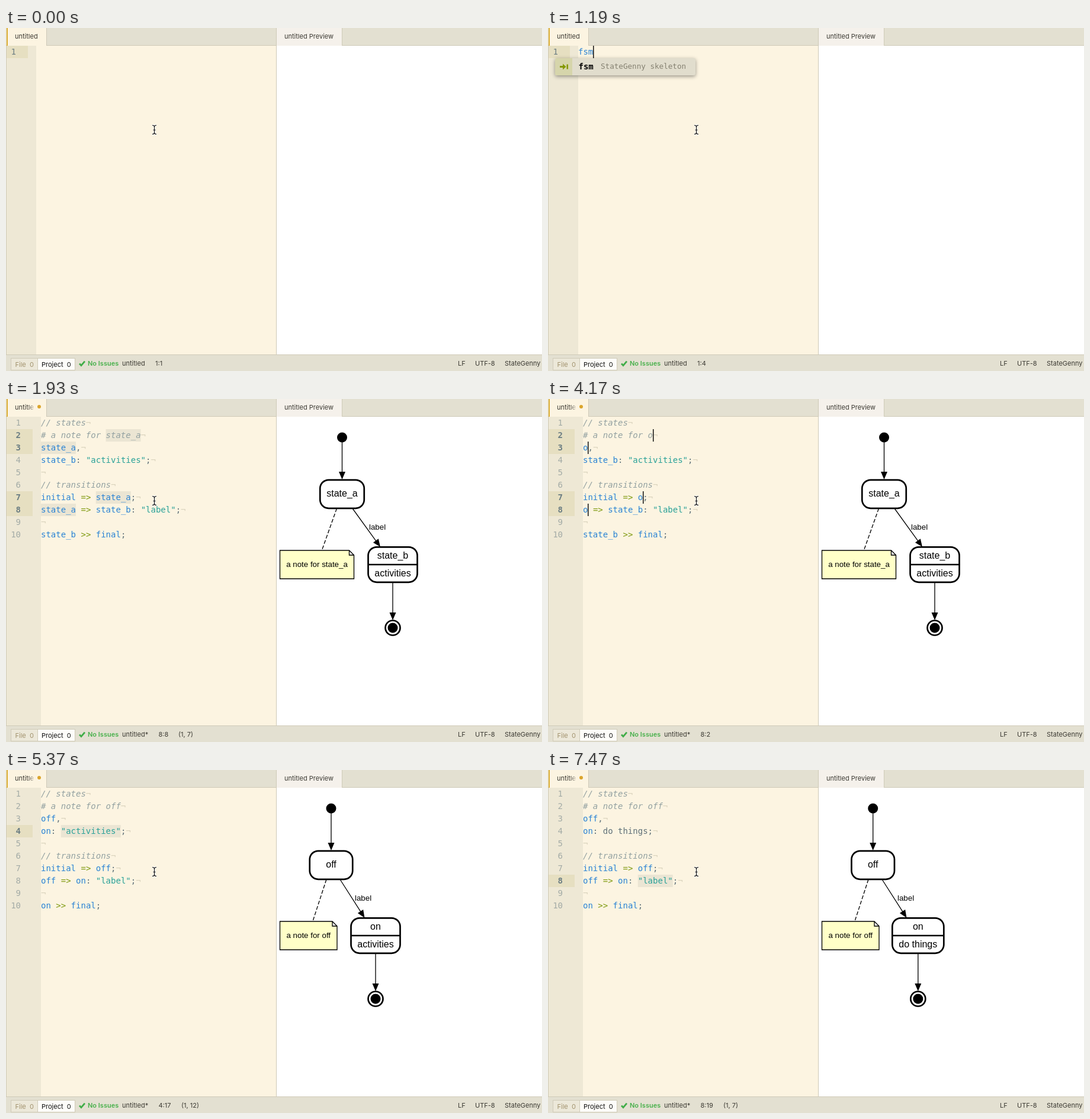
Animation, 905 px wide and 580 px high, one loop 8000 ms. Source, as an HTML page:

```html
<!DOCTYPE html>
<html lang="en">
<head>
<meta charset="utf-8">
<title>State machine editor</title>
<style>
html, body { margin: 0; width: 100%; height: 100%; overflow: hidden; background: #fff; }
svg { display: block; width: 100%; height: 100%; }
text { white-space: pre; }
.ui { font: 11px Inter, sans-serif; fill: #3c3a33; }
.code, .num { font: 14px "DejaVu Sans Mono", monospace; }
.num { fill: #a3aba6; text-anchor: end; }
.num.on { fill: #6b7d82; }
.num.bold { font-weight: bold; }
.comment { fill: #93a1a1; font-style: italic; }
.string { fill: #2aa198; }
.op { fill: #7f9a10; }
.name { fill: #2a83d4; }
.plain { fill: #5f7078; }
.eol { fill: #dad3bd; }
.sel { fill: #ebe5d3; }
.popup { filter: drop-shadow(0 2px 3px rgba(0, 0, 0, .4)); }
.msg { font: 13px Inter, sans-serif; fill: #45433b; }
.big { font: 16px "Liberation Sans", Helvetica, sans-serif; text-anchor: middle; }
.small { font: 13.33px "Liberation Sans", Helvetica, sans-serif; }
.edge { stroke: #000; stroke-width: 1.33; fill: none; }
.box { stroke: #000; stroke-width: 2.7; fill: none; }
</style>
</head>
<body>
<svg viewBox="0 0 905 580">
  <defs>
    <linearGradient id="fade" gradientUnits="userSpaceOnUse" x1="38" x2="48" y1="0" y2="0">
      <stop stop-color="#3c3a33"/>
      <stop offset="1" stop-color="#3c3a33" stop-opacity="0.1"/>
    </linearGradient>
  </defs>

  <rect width="905" height="580" fill="#e3e0d1"/>
  <rect y="29" width="905" height="524" fill="#cfcab8"/>
  <rect x="1" y="30" width="455" height="522" fill="#fcf4e1"/>
  <rect x="457" y="30" width="448" height="522" fill="#fff"/>
  <rect x="456" width="1" height="552" fill="#cfcab8"/>
  <rect x="1" width="67" height="30" fill="#fcf4e1"/>
  <rect x="1" width="2" height="30" fill="#dcae35"/>
  <rect x="68" width="1" height="30" fill="#cfcab8"/>
  <rect x="457" width="110" height="30" fill="#f5f1eb"/>
  <rect x="567" width="1" height="30" fill="#cfcab8"/>
  <text class="ui" x="470" y="18">untitled Preview</text>

  <rect x="8.5" y="558.5" width="45" height="20" fill="#ece8d9" stroke="#d0cbb8"/>
  <rect x="53.5" y="558.5" width="63" height="20" fill="#fdfcf9" stroke="#d0cbb8"/>
  <text class="ui" x="15.500" y="573" style="fill:#a1916c">File  0</text>
  <text class="ui" x="60" y="573" style="fill:#111">Project  0</text>
  <path d="M124 567.500l3 3.200 6-7" fill="none" stroke="#40ad48" stroke-width="2.800"/>
  <text class="ui" x="138" y="571" style="fill:#47b04b;font-weight:600">No Issues</text>
  <text class="ui" x="763" y="571">LF</text>
  <text class="ui" x="792" y="571">UTF-8</text>
  <text class="ui" x="842" y="571">StateGenny</text>

  <g id="scene"></g>

  <g id="pointer" fill="none">
    <path id="beam" d="M247 164.500q3 0 3.500 2q.5-2 3.500-2M250.500 166.500v11M247 179.500q3 0 3.500-2q.5 2 3.500 2M248.500 172.500h4" stroke="#fff" stroke-opacity=".7" stroke-width="3"/>
    <use href="#beam"/>
    <path d="M247 164.500q3 0 3.500 2q.5-2 3.500-2M250.500 166.500v11M247 179.500q3 0 3.500-2q.5 2 3.500 2M248.500 172.500h4" stroke="#111" stroke-width="1.200"/>
  </g>
</svg>
<script>
const LOOP = 8000, CHAR = 8.43, ROW = 21, TOP = 30;
const scene = document.getElementById('scene');

const rect = (x, y, w, h, attrs) => `<rect x="${x}" y="${y}" width="${w}" height="${h}" ${attrs}/>`;
const text = (cls, x, y, s, attrs = '') => `<text class="${cls}" x="${x}" y="${y}" ${attrs}>${s}</text>`;

// In code lines, [..] marks a selection and | a caret.
const snippet = (a, b, activity, label = '"label"') => [
  '// states', `# a note for ${a}`, `${a},`, `${b}: ${activity};`, '',
  '// transitions', `initial => ${a};`, `${a} => ${b}: ${label};`, '', `${b} >> final;`
];

const TOKENS = /^(?:\/\/|#).*|"[^"]*"|[=>]>|: [a-z ]*|\w+|[^\w"]/g;
function tokenClass(t) {
  if (/^(\/\/|#)/.test(t)) return 'comment';
  if (t[0] === '"') return 'string';
  if (/^[=>]>/.test(t)) return 'op';
  return /^\w/.test(t) ? 'name' : 'plain';
}
const span = (cls, s) => `<tspan class="${cls}">${s}</tspan>`;

function editor(lines) {
  const wide = lines.length > 9 ? 8 : 0, left = 51 + wide;
  let out = rect(1, TOP, left - 1, 522, 'fill="#eee8d5"');
  lines.forEach((line, i) => {
    const y = TOP + i * ROW, open = line.indexOf('['), caret = line.indexOf('|');
    const active = lines.length === 1 || open >= 0 || caret >= 0;
    if (active) out += rect(1, y, 36 + wide, ROW, 'fill="#e6dfc1"');
    out += text(`num${active ? ' on' : ''}${active && wide ? ' bold' : ''}`, 17 + wide, y + 15, i + 1);
    if (open >= 0) {
      const length = line.indexOf(']') - open - 1;
      out += rect(left + open * CHAR, y, length * CHAR, ROW, 'class="sel"');
    }
    const tokens = line.replace(/[[\]|]/g, '').match(TOKENS) || [];
    const eol = i < lines.length - 1 ? span('eol', '¬') : '';
    out += text('code', left, y + 15, tokens.map(t => span(tokenClass(t), t)).join('') + eol);
    if (caret >= 0) out += rect(Math.round(left + caret * CHAR), y, 1.5, ROW, 'fill="#111"');
  });
  return out;
}

function popup(typed) {
  return '<g class="popup">' + rect(12, 51, 237, 29, 'rx="3" fill="#e1ddcd"') + '</g>' +
    '<path d="M41 51h-26a3 3 0 0 0-3 3v23a3 3 0 0 0 3 3h26z" fill="#d6d5ab"/>' +
    '<path d="M20 64h5v-3.500l5.500 5-5.500 5v-3.500h-5zM31.500 61.500h2.500v8h-2.500z" fill="#859900"/>' +
    text('code', 51.5, 70, `<tspan font-weight="bold">${typed}</tspan>` +
      `<tspan fill="#4a483f">${'fsm'.slice(typed.length)}</tspan>`) +
    text('code', 89, 69, 'StateGenny skeleton', 'style="font-size:12.6px;fill:#858171"');
}

function errorPanel() {
  return rect(483, 52, 402, 52, 'fill="#e4e0d1"') +
    rect(489, 60, 187, 20, 'rx="3" fill="#dbd7c6"') +
    '<path d="M501 64c4 3 1 5 3.500 6q1.500-1 1-3c4 5 2 10-4 10q-7-1-6-7q1 2 2.500 1.500c-.5-4 3-4 3-7.500z" fill="#222"/>' +
    text('msg', 514.5, 75, 'error on line 1, column 1', 'style="font-size:13.4px;font-weight:700;fill:#2c2a25"') +
    text('msg', 689, 73, 'Expected comment, end of') +
    text('msg', 489.5, 94, 'input, line end, or whitespace but "f" found.') +
    rect(483, 114, 402, 31, 'rx="3" fill="#fcf4e1"') +
    text('code', 504, 133, '1', 'style="font-size:11px;fill:#555"') +
    text('code', 519, 133, 'fsm', 'style="font-size:11px"') +
    rect(519, 134, 7, 1, '');
}

function arrow(x1, y1, x2, y2) {
  const length = Math.hypot(x2 - x1, y2 - y1), angle = Math.atan2(y2 - y1, x2 - x1) * 180 / Math.PI;
  return `<g transform="translate(${x1} ${y1}) rotate(${angle})"><path class="edge" d="M0 0H${length - 12}"/>` +
    `<path d="M${length} 0l-13-5.500v11z"/></g>`;
}

function diagram({ a, b, activity, ax, aw, noteRight, dash, from, tip, bx, bw, labelX }) {
  const r = noteRight;
  return `<circle cx="${ax}" cy="65" r="8.500"/>` + arrow(ax, 73, ax, 136) +
    rect(ax - aw / 2, 136.8, aw, 48, 'rx="14.500" class="box"') + text('big', ax, 165, a) +
    `<path class="edge" stroke-dasharray="6.500 3" d="M${dash[0]} 185L${dash[1]} 254"/>` +
    `<path class="edge" style="fill:#ffffc8" d="M462.500 256H${r - 8}l8 8v40H462.500zM${r - 8} 256v8h8"/>` +
    text('small', (462.5 + r) / 2, 284, 'a note for ' + a, 'text-anchor="middle"') +
    arrow(from, 185, tip, 250) + text('small', labelX, 221, 'label') +
    rect(bx - bw / 2, 250.3, bw, 59.5, 'rx="14.500" class="box"') +
    `<path class="box" style="stroke-width:2.400" d="M${bx - bw / 2} 280H${bx + bw / 2}"/>` +
    text('big', bx, 270, b) + text('big', bx, 300, activity) +
    arrow(bx, 310, bx, 374) +
    `<circle cx="${bx}" cy="387" r="12.500" class="box"/><circle cx="${bx}" cy="387" r="8.500"/>`;
}

const wideGraph = { a: 'state_a', b: 'state_b', activity: 'activities', ax: 567.5, aw: 74.5, noteRight: 587.5,
  dash: [558.5, 534], from: 585, tip: 632, bx: 653, bw: 83, labelX: 613 };
const offGraph = { ...wideGraph, a: 'off', ax: 549, aw: 72.5, noteRight: 559,
  dash: [541, 518.5], from: 564, tip: 605.5, bx: 624, bw: 83, labelX: 589 };
const onGraph = { ...offGraph, b: 'on' };
const doneGraph = { ...onGraph, activity: 'do things', ax: 548.7, bx: 624.8, bw: 87, labelX: 590 };

const ACT = '"activities"', TYPED = 'do things';
const nameA = a => ({ lines: snippet(a + '|', 'state_b', ACT), pos: `8:${a.length + 1}`, sel: '' });
const nameB = b => ({ lines: snippet('off', b + '|', ACT), pos: `10:${b.length + 1}`, sel: '' });
const typeActivity = n => ({ lines: snippet('off', 'on', TYPED.slice(0, n) + '|'), pos: `4:${5 + n}`, sel: '' });

// Each entry changes only what it lists.
const steps = [
  [0, { lines: [''], pos: '1:1', sel: '', popup: '', dirty: false, preview: '' }],
  [450, { lines: ['|'] }],
  [600, { lines: ['f|'], pos: '1:2' }],
  [750, { lines: ['fs|'], pos: '1:3' }],
  [900, { popup: 'fs' }],
  [1190, { lines: ['fsm|'], pos: '1:4', popup: 'fsm' }],
  [1340, { lines: snippet('[state_a]', 'state_b', ACT), pos: '8:8', sel: '(1, 7)', popup: '' }],
  [1480, { dirty: true }],
  [1630, { preview: errorPanel() }],
  [1930, { preview: diagram(wideGraph) }],
  [4170, nameA('o')],
  [4320, nameA('of')],
  [4470, nameA('off')],
  [4620, { lines: snippet('off', '[state_b]', ACT), pos: '10:8', sel: '(1, 7)' }],
  [4770, { preview: diagram(offGraph) }],
  [4920, nameB('o')],
  [5070, nameB('on')],
  [5370, { lines: snippet('off', 'on', `[${ACT}]`), pos: '4:17', sel: '(1, 12)', preview: diagram(onGraph) }],
  ...[1, 2, 4, 6, 8, 9].map((n, i) => [6420 + i * 150, typeActivity(n)]),
  [7320, { lines: snippet('off', 'on', TYPED, '["label"]'), pos: '8:19', sel: '(1, 7)' }],
  [7470, { preview: diagram(doneGraph) }]
];

let state = {};
const views = steps.map(([, change]) => {
  state = { ...state, ...change };
  const { lines, pos, sel, dirty } = state;
  const tab = dirty
    ? text('ui', 15, 18, 'untitle', 'style="fill:url(#fade)"') + '<circle cx="56" cy="13" r="3" fill="#dba52c"/>'
    : text('ui', 15, 18, 'untitled');
  return tab + editor(lines) + (state.popup && popup(state.popup)) + state.preview +
    text('ui', 196, 571, dirty ? 'untitled*' : 'untitled') +
    text('ui', lines.length > 1 ? 257.5 : 252, 571, pos) +
    text('ui', pos.length > 3 ? 296 : 291, 571, sel);
});

let shown = -1;
function frame() {
  const time = performance.now() % LOOP;
  const index = steps.filter(([start]) => start <= time).length - 1;
  if (index !== shown) scene.innerHTML = views[shown = index];
  requestAnimationFrame(frame);
}
frame();
</script>
</body>
</html>
```
